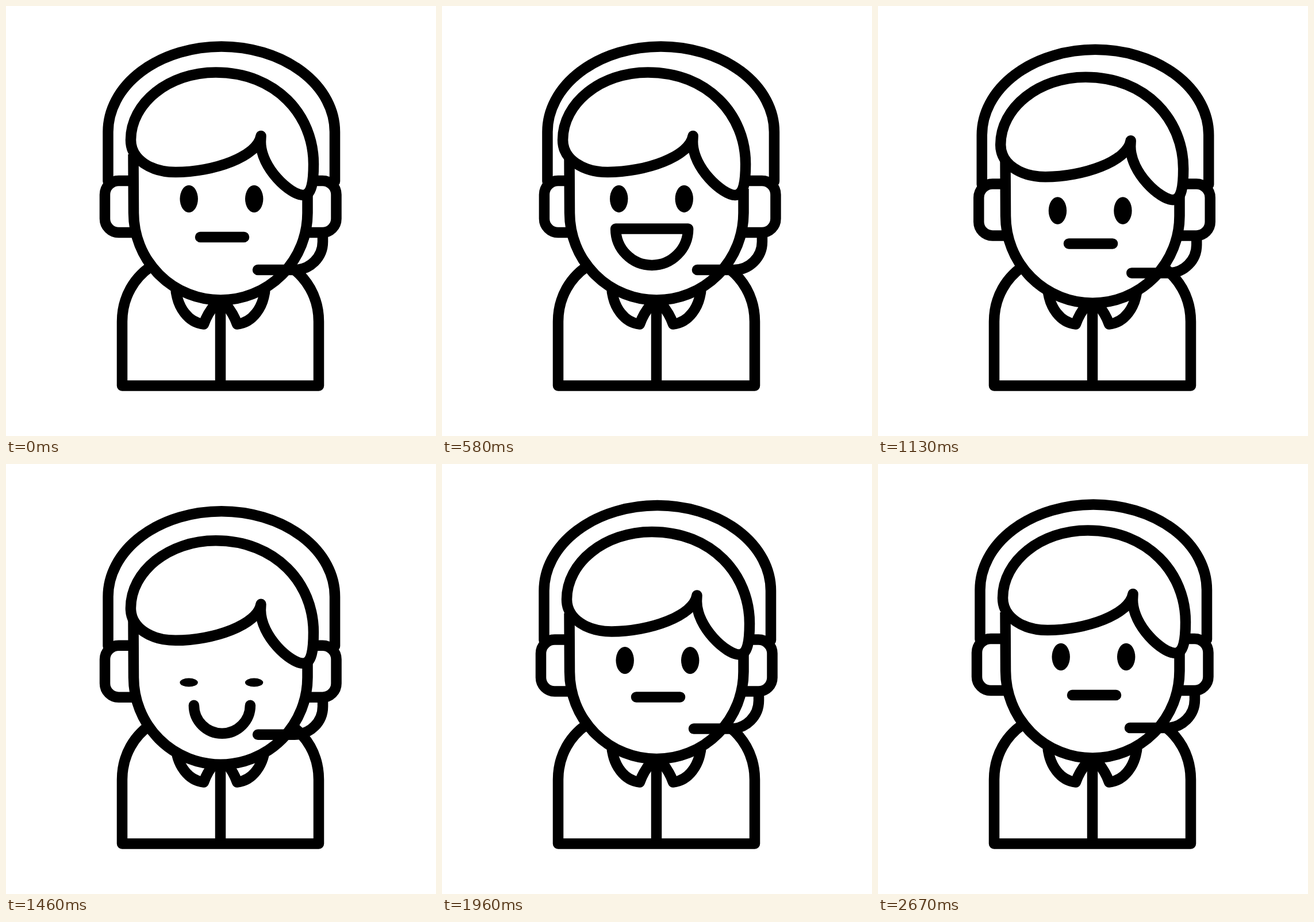
Recreate the animation shown at these times as an HTML page. Size 748 by 748 pixels, loop 2750 ms.

```html
<!DOCTYPE html>
<html lang="en">
<head>
<meta charset="utf-8">
<title>Headset agent</title>
<style>
  html, body { margin: 0; width: 100%; height: 100%; overflow: hidden; background: #fff; }
  svg { display: block; width: 100vw; height: 100vh; }
  .line { fill: none; stroke: #000; stroke-width: 18.5; stroke-linecap: round; stroke-linejoin: round; }
  .solid { fill: #fff; }
  .butt { stroke-linecap: butt; }
</style>
</head>
<body>
<svg viewBox="0 0 748 748">
  <g class="line">
    <path d="M260 448C222 470 202 508 202 549V660.5H544V549C544 508 524 470 486 448"/>
    <path d="M373 512V658"/>
    <path id="collar" d="M295 488C297 525 318 551 344 553.5C348 541 356 528 366 516"/>
    <use href="#collar" transform="matrix(-1 0 0 1 746 0)"/>
  </g>
  <g class="line" data-part="set">
    <path d="M177.5 305V219A197.2 148.5 0 0 1 572 219V305"/>
    <path class="solid" d="M240 304H196A24 24 0 0 0 172 328V370A24 24 0 0 0 196 394H240"/>
    <path class="solid" d="M506 304H550.5A24 24 0 0 1 574.5 328V370A24 24 0 0 1 550.5 394H506"/>
  </g>
  <g class="line" data-part="face">
    <path class="solid butt" d="M221.5 258L222 360A151.2 151.5 0 0 0 524.5 360V318"/>
  </g>
  <g class="line" data-part="set">
    <path d="M551 400V410A49 49 0 0 1 502 459H438"/>
  </g>
  <g class="line" data-part="hair">
    <path class="solid" d="M443.5 226C438 262 361 289 295 289C252 289 217 267 217 233C217 169 283 115.5 365 115.5C470 115.5 535 190 535 275C535 305 532 329 517 329C495 329 443 282 443 236Z"/>
  </g>
  <g data-part="eyes">
    <ellipse cx="318.2" cy="335.5" rx="15.7" ry="23.7"/>
    <ellipse cx="431.7" cy="335.5" rx="15.7" ry="23.7"/>
  </g>
  <g class="line" data-part="mouth"><path id="lips"/></g>
</svg>
<script>
  const LOOP = 2750, FPS = 24;
  const eyes = document.querySelectorAll('ellipse');
  const lips = document.getElementById('lips');

  const ease = (x, a, b) => {
    const u = Math.min(1, Math.max(0, (x - a) / (b - a)));
    return u * u * (3 - 2 * u);
  };
  // rises over a..b, falls over c..d
  const bump = (x, a, b, c, d) => ease(x, a, b) - ease(x, c, d);

  const move = (part, x, y) => {
    for (const el of document.querySelectorAll(`[data-part=${part}]`)) {
      el.setAttribute('transform', `translate(${x.toFixed(2)} ${y.toFixed(2)})`);
    }
  };

  function draw(step) {
    const turn = bump(step, 0, 15, 19, 36);
    const nod = bump(step, 19, 36, 37, 50);
    const blink = bump(step, 55, 59, 61, 64);
    const laugh = bump(step, 8, 12, 15, 20) + blink;
    const grin = bump(step, 28, 33, 37, 43);
    const shut = bump(step, 30, 34, 37, 42) + blink;
    const lift = step < 19 ? -4.4 * turn * (1 - turn) : 0;

    move('set', 6 * turn, 11.8 * nod);
    move('face', 0, 11.3 * nod);
    move('hair', -7 * turn, 18 * nod + lift * .5);
    move('eyes', -10.6 * turn, 45 * nod + lift);
    move('mouth', -11 * turn, 25 * nod + lift);

    for (const eye of eyes) eye.setAttribute('ry', 23.7 - 16.2 * shut);

    const w = 38 + 25 * laugh + 11 * grin;
    const depth = 63.5 * laugh + 49 * grin;
    const y = 402 - 14.5 * laugh - 7 * grin;
    const curve = depth < .1 ? `H${376 + w}` : `A${w} ${depth} 0 0 0 ${376 + w} ${y}`;
    lips.setAttribute('d', `M${376 - w} ${y}${curve}${laugh > 0 ? 'Z' : ''}`);
  }

  function tick() {
    const t = performance.now() % LOOP;
    draw(Math.floor(t * FPS / 1000 + .12));
    requestAnimationFrame(tick);
  }
  tick();
</script>
</body>
</html>
```
